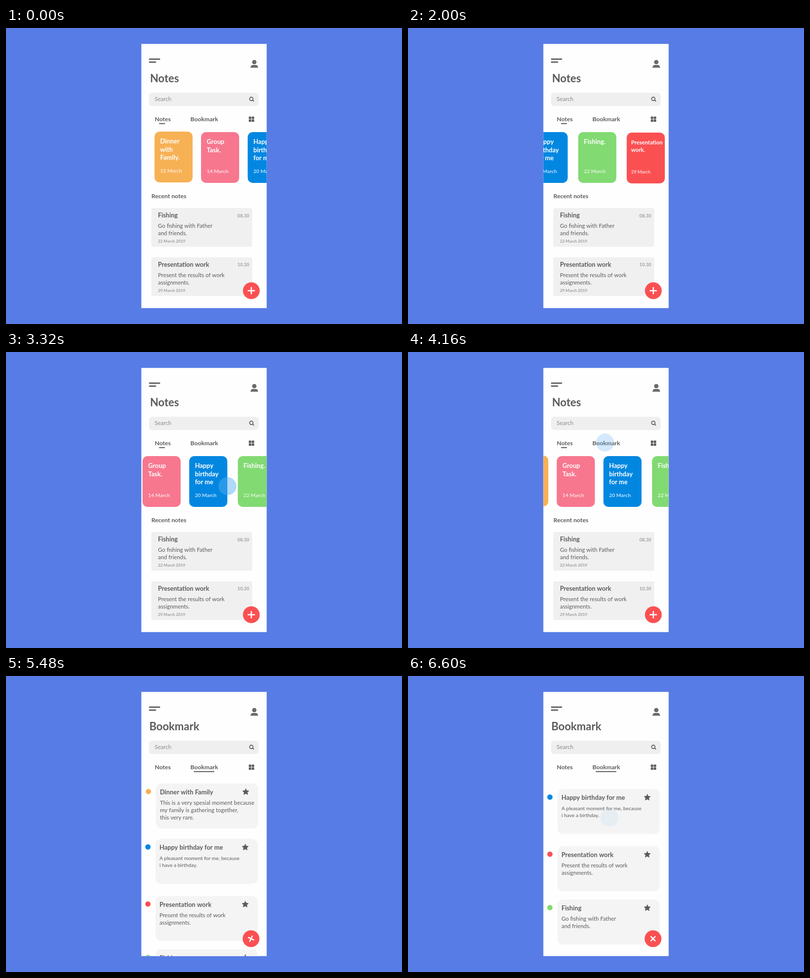
Animation of 800x600 px, one loop 8 s. Source, as an HTML page with a canvas:

```html
<!DOCTYPE html>
<html lang="en">
<head>
<meta charset="utf-8">
<title>Notes app</title>
<style>
  html, body { margin: 0; width: 100%; height: 100%; overflow: hidden; background: #577ce6; }
  canvas { display: block; width: 800px; height: 600px; }
</style>
</head>
<body>
<canvas id="stage" width="800" height="600"></canvas>
<script>
const ctx = document.getElementById('stage').getContext('2d');
const LOOP = 8000, LAST_MOVE = 6600;
const INK = '#5b5b5b', RED = '#fb5052', ORANGE = '#f7b155', PINK = '#f7778f', BLUE = '#0287e1', GREEN = '#82da72';

const noteCards = [
  { x: 300, y: 210, color: ORANGE, lines: ['Dinner', 'with', 'Family.'], date: '12 March' },
  { x: 394, y: 211, color: PINK, lines: ['Group', 'Task.'], date: '14 March' },
  { x: 488.3, y: 211, color: BLUE, lines: ['Happy', 'birthday', 'for me'], date: '20 March' },
  { x: 586.5, y: 211, color: GREEN, lines: ['Fishing.'], date: '22 March' },
  { x: 684.5, y: 212, color: RED, lines: ['Presentation', 'work.'], date: '29 March', small: true }
];
const recentNotes = [
  { y: 365, title: 'Fishing', time: '08.30', lines: ['Go fishing with Father', 'and friends.'], date: '22 March 2019' },
  { y: 464.7, title: 'Presentation work', time: '10.30', lines: ['Present the results of work', 'assignments.'], date: '29 March 2019' }
];
const bookmarks = [
  { x: 303, y: 218, color: ORANGE, title: 'Dinner with Family', size: 11.5, step: 15,
    lines: ['This is a very spesial moment because', 'my family is gathering together,', 'this very rare.'] },
  { x: 302, y: 330.3, color: BLUE, title: 'Happy birthday for me', size: 10.3, step: 13.5,
    lines: ['A pleasant moment for me, because', 'i have a birthday.'] },
  { x: 302, y: 446, color: RED, title: 'Presentation work', size: 11.3, step: 15,
    lines: ['Present the results of work', 'assignments.'] },
  { x: 302, y: 554.3, color: GREEN, title: 'Fishing', size: 11.4, step: 15,
    lines: ['Go fishing with Father', 'and friends.'] }
];

const clamp = v => Math.max(0, Math.min(1, v));
const mix = (a, b, k) => a + (b - a) * k;

// cubic-bezier(.25, .1, .25, 1)
function ease(x) {
  let lo = 0, hi = 1, s = 0.5;
  for (let i = 0; i < 24; i++) {
    s = (lo + hi) / 2;
    if (0.75 * s * (1 - s) + s ** 3 < x) lo = s; else hi = s;
  }
  return 0.3 * s * (1 - s) ** 2 + 3 * s * s * (1 - s) + s ** 3;
}
function between(t, start, end) {
  const k = clamp((t - start) / (end - start));
  return k === 0 || k === 1 ? k : ease(k);
}

function box(x, y, w, h, r, color) {
  ctx.fillStyle = color;
  ctx.beginPath();
  ctx.roundRect(x, y, w, h, r);
  ctx.fill();
}
function disc(x, y, r, color) {
  ctx.fillStyle = color;
  ctx.beginPath();
  ctx.arc(x, y, r, 0, Math.PI * 2);
  ctx.fill();
}
function line(x1, y1, x2, y2, width, color = INK) {
  ctx.strokeStyle = color;
  ctx.lineWidth = width;
  ctx.lineCap = 'round';
  ctx.beginPath();
  ctx.moveTo(x1, y1);
  ctx.lineTo(x2, y2);
  ctx.stroke();
}
function text(str, x, y, size, color = INK, weight = 700) {
  ctx.font = `${weight} ${size}px Lato, sans-serif`;
  ctx.fillStyle = color;
  ctx.fillText(str, x, y);
}
function star(x, y, r) {
  ctx.fillStyle = ctx.strokeStyle = INK;
  ctx.lineWidth = 1;
  ctx.lineJoin = 'round';
  ctx.beginPath();
  for (let i = 0; i < 10; i++) {
    const a = i * Math.PI / 5 - Math.PI / 2, d = i % 2 ? r * 0.48 : r;
    ctx.lineTo(x + d * Math.cos(a), y + d * Math.sin(a));
  }
  ctx.closePath();
  ctx.fill();
  ctx.stroke();
}
function layer(alpha, dx, dy, draw) {
  if (alpha <= 0) return;
  ctx.save();
  ctx.globalAlpha = alpha;
  ctx.translate(dx, dy);
  draw();
  ctx.restore();
}

function drawHeader(tab) {
  line(290, 63.1, 310.2, 63.1, 2.6);
  line(290, 69.1, 302.2, 69.1, 2.6);
  disc(501.6, 69.2, 4.4, '#6a6a6a');
  box(494, 75, 15.2, 5.6, [5.5, 5.5, 1, 1], '#6a6a6a');

  layer(1 - tab, 0, 0, () => text('Notes', 291, 109.5, 22));
  layer(tab, 0, 0, () => text('Bookmark', 289.5, 109.5, 22));

  box(289, 131.3, 221.5, 27, 7, '#efefef');
  text('Search', 300.3, 148, 11.5, '#8a8a8a', 400);
  ctx.strokeStyle = INK;
  ctx.lineWidth = 1.6;
  ctx.beginPath();
  ctx.arc(495.6, 143.6, 3.5, 0, Math.PI * 2);
  ctx.stroke();
  line(498.4, 146.4, 500.4, 148.4, 1.7);

  text('Notes', 300.5, 189, 12.2);
  text('Bookmark', 372.5, 189, 12.2);
  line(mix(310, 380, tab), 193.8, mix(320.3, 420, tab), 193.8, 2);
  for (const x of [490.5, 496.4])
    for (const y of [179.4, 185.3]) box(x, y, 5, 5, 1.2, INK);
}

function drawNoteCard(card) {
  const { x, y, small } = card;
  const left = x + (small ? 9 : 11.5);
  box(x, y, 77, 103, 10, card.color);
  card.lines.forEach((str, i) =>
    text(str, left, y + 24.4 + i * (small ? 15 : 16.5), small ? 11.2 : 12.8, '#fff'));
  text(card.date, left, y + 83.3, small ? 9.2 : 10.3, 'rgba(255,255,255,.75)');
}

function drawRecentNote(note) {
  const { y } = note;
  box(293.5, y, 204, 78.5, 4, '#f0f0f0');
  text(note.title, 307, y + 19, 12.6);
  text(note.time, 467.5, y + 18.5, 9.3, '#a0a0a0');
  note.lines.forEach((str, i) => text(str, 307, y + 40 + i * 15, 11.4, INK, 400));
  text(note.date, 307, y + 70, 8.1, '#9a9a9a');
}

function drawBookmark(item) {
  const { x, y } = item;
  box(x, y, 206.5, 91, 11, '#f4f4f4');
  disc(x - 15.3, y + 16.2, 5.4, item.color);
  text(item.title, x + 8, y + 21.8, 12.8);
  star(x + 181.3, y + 17, 6.6);
  item.lines.forEach((str, i) => text(str, x + 8, y + 42.8 + i * item.step, item.size, INK, 400));
}

function drawButton(t, tab) {
  ctx.save();
  ctx.translate(mix(495.6, 495, tab), 532.5);
  disc(0, 0, 17, RED);
  ctx.rotate(between(t, 4900, 5700) * 405 * Math.PI / 180);
  const arm = mix(6.3, 5.8, tab);
  line(-arm, 0, arm, 0, 2.5, '#fff');
  line(0, -arm, 0, arm, 2.5, '#fff');
  ctx.restore();
}

function drawTouch(t, press, release, fade, x, y) {
  const alpha = 0.7 * Math.min(clamp((t - press) / 60), 1 - clamp((t - release) / fade));
  layer(alpha, 0, 0, () => disc(x, y, 18.2, 'rgb(85,170,240)'));
}

function draw(now) {
  const t = Math.min(now % LOOP, LAST_MOVE);
  const swipe = between(t, 984, 2394), back = between(t, 2870, 3690);
  const shift = -255.5 * swipe + 162 * back;
  const leave = between(t, 4300, 4800), tab = between(t, 4320, 4900);
  const scroll = -101 * between(t, 5890, 6590);

  ctx.fillStyle = '#577ce6';
  ctx.fillRect(0, 0, 800, 600);
  ctx.save();
  ctx.beginPath();
  ctx.rect(273.4, 32.2, 253.2, 535.6);
  ctx.fillStyle = '#fefefe';
  ctx.fill();
  ctx.clip();

  drawHeader(tab);
  layer(1 - leave, shift - 120 * leave, 0, () => noteCards.forEach(drawNoteCard));
  layer(1 - leave, -120 * leave, 0, () => {
    text('Recent notes', 293.7, 345, 12.2);
    recentNotes.forEach(drawRecentNote);
  });

  ctx.save();
  ctx.beginPath();
  ctx.rect(273, 215, 254, 354);
  ctx.clip();
  bookmarks.forEach((item, i) => {
    const enter = between(t, 4560 + i * 110, 5140 + i * 110);
    layer(enter, -240 * (1 - enter), scroll, () => drawBookmark(item));
  });
  ctx.restore();

  drawButton(t, tab);
  drawTouch(t, 800, 1380, 240, 440 - 255.5 * swipe, 272);
  drawTouch(t, 2797, 3240, 240, 310 + 162 * back, 272);
  drawTouch(t, 4140, 4300, 200, 398, 183.5);
  drawTouch(t, 5800, 6320, 320, 407, 388 + scroll);
  ctx.restore();
}

const start = performance.now();
function tick() {
  draw(performance.now() - start);
  requestAnimationFrame(tick);
}
tick();
</script>
</body>
</html>
```
